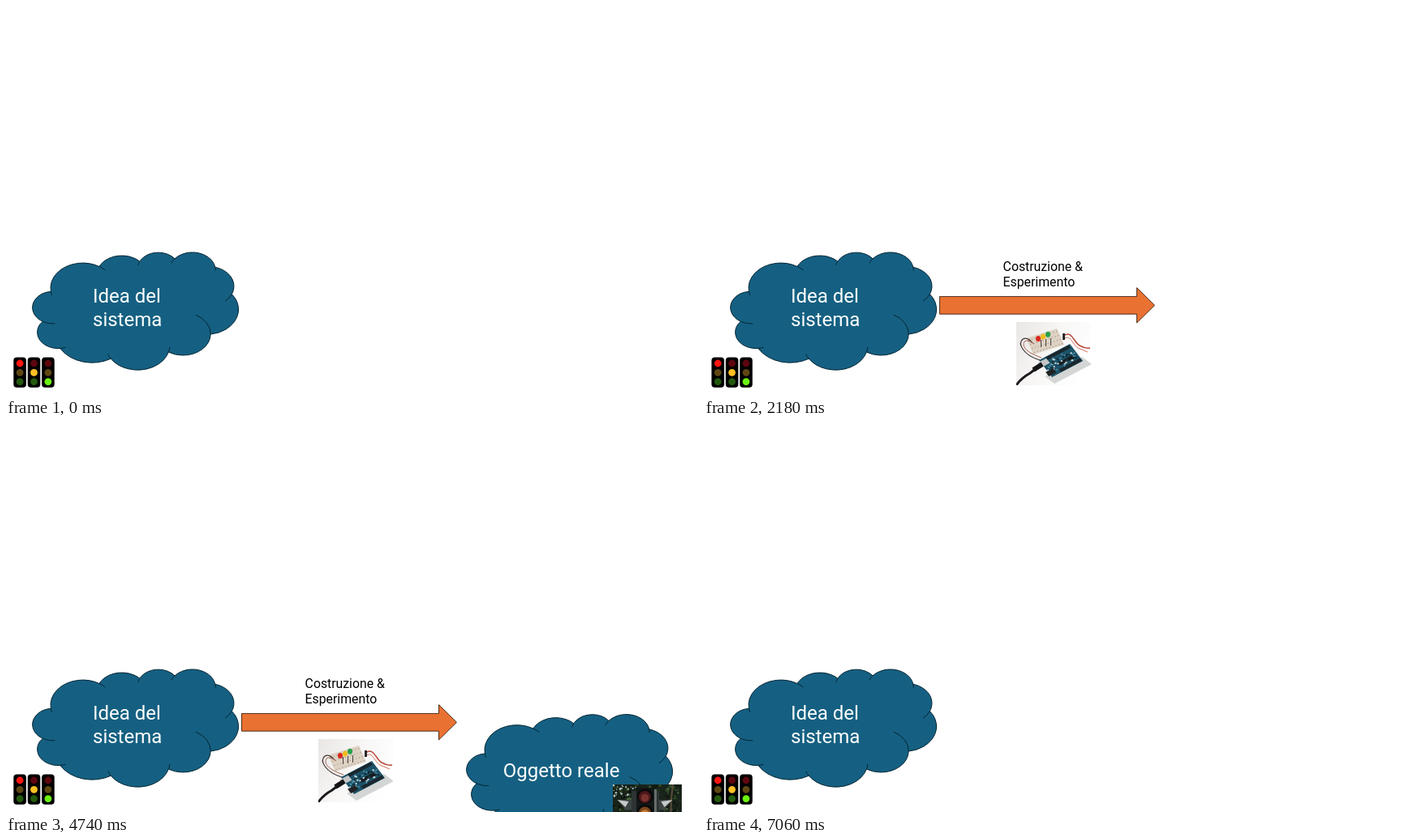
Write an HTML page with a canvas that moves like this. It is 853x480 px and loops after 8 s.

```html
<!DOCTYPE html>
<html lang="it">
<head>
<meta charset="utf-8">
<title>Idea del sistema</title>
<style>
html, body { margin: 0; width: 100%; height: 100%; overflow: hidden; background: #fff; }
canvas { display: block; }
</style>
</head>
<body>
<canvas id="stage" width="853" height="480"></canvas>
<script>
const ctx = document.getElementById('stage').getContext('2d');
const LOOP = 8000, STEP = 240, FONT = 'Roboto, "Open Sans", sans-serif';
const BUILD_AT = 500, REAL_AT = 3780, CLEAR_AT = 7060;
const CLOUD_W = 254, CLOUD_H = 145, BUMP_RATIO = 1.361;

// Where each bump of the cloud begins, in percent: x, y, radius,
// and the crease in degrees: > 0 runs on from the last bump, < 0 leads into this one
const KNOTS = [
  [9, 33.3, 15.6, -9], [32.4, 12, 12.3, 14], [52.1, 7.7, 10.1, -14], [69.1, 5.4, 11.2, -17],
  [88.7, 12.6, 12.3, 11], [96.8, 35.5, 15.7, 26], [86.5, 69.7, 13.4, -64], [66.1, 84.9, 15.6, -12],
  [38.1, 90.5, 17.9, 12], [13.5, 81.7, 10.1, -15], [5, 58.8, 10.1, -35]
];

// Clockwise arc of radius r between two knots, as a circle in flattened space
function bump([x0, y0, r], [x1, y1]) {
  const dx = x1 - x0, dy = (y1 - y0) / BUMP_RATIO, chord = Math.hypot(dx, dy);
  const h = Math.sqrt(Math.max(0, r * r - chord * chord / 4)) / chord;
  const cx = (x0 + x1) / 2 - dy * h, cy = (y0 + y1) / 2 / BUMP_RATIO + dx * h;
  const angle = (x, y) => Math.atan2(y / BUMP_RATIO - cy, x - cx);
  return { x: cx, y: cy * BUMP_RATIO, r, from: angle(x0, y0), to: angle(x1, y1) };
}

const outline = new Path2D(), creases = new Path2D();
const bumps = KNOTS.map((knot, i) => bump(knot, KNOTS[(i + 1) % KNOTS.length]));
const addArc = (path, b, from, to) => path.ellipse(b.x, b.y, b.r, b.r * BUMP_RATIO, 0, from, to);
bumps.forEach((b, i) => {
  addArc(outline, b, b.from, b.to);
  const [x, y, , degrees] = KNOTS[i], turn = degrees * Math.PI / 180;
  const last = bumps.at(i - 1), crease = new Path2D();
  if (turn > 0) addArc(crease, last, last.to, last.to + turn);
  else addArc(crease, b, b.from + turn, b.from);
  creases.addPath(crease);
});
outline.closePath();

function randomFrom(seed) {
  return () => (seed = seed * 16807 % 2147483647) / 2147483647;
}

function poly(color, ...pts) {
  ctx.beginPath();
  for (let i = 0; i < pts.length; i += 2) ctx.lineTo(pts[i], pts[i + 1]);
  ctx.closePath();
  ctx.fillStyle = color;
  ctx.fill();
}

function dot(color, x, y, rx, ry = rx) {
  ctx.beginPath();
  ctx.ellipse(x, y, rx, ry, 0, 0, 7);
  ctx.fillStyle = color;
  ctx.fill();
}

function rect(color, x, y, w, h) {
  ctx.fillStyle = color;
  ctx.fillRect(x, y, w, h);
}

function wire(color, width, d) {
  ctx.strokeStyle = color;
  ctx.lineWidth = width;
  ctx.stroke(new Path2D(d));
}

function label(text, x, y, size, color) {
  ctx.font = `${size}px ${FONT}`;
  ctx.fillStyle = color;
  ctx.fillText(text, x, y);
}

// Runs paint in a unit square skewed onto the edges u and v
function slab(x, y, ux, uy, vx, vy, paint) {
  ctx.save();
  ctx.transform(ux, uy, vx, vy, x, y);
  paint();
  ctx.restore();
}

function photo(x, y, w, h, paint) {
  ctx.save();
  ctx.translate(x, y);
  ctx.beginPath();
  ctx.rect(0, 0, w, h);
  ctx.clip();
  paint(w, h);
  ctx.restore();
}

function cloud(x, y) {
  const place = new DOMMatrix([CLOUD_W / 100, 0, 0, CLOUD_H / 100, x, y]);
  const body = new Path2D(), lines = new Path2D();
  body.addPath(outline, place);
  lines.addPath(outline, place);
  lines.addPath(creases, place);
  ctx.fillStyle = '#156082';
  ctx.fill(body);
  ctx.strokeStyle = '#042433';
  ctx.lineWidth = 1;
  ctx.stroke(lines);
}

function trafficLights() {
  const dim = ['#5c0610', '#5e4613', '#235a0d'];
  const lit = ['#ff1512', '#ffc024', '#6cf20f'];
  for (let i = 0; i < 3; i++) {
    const x = 9.3 + i * 17.4;
    ctx.beginPath();
    ctx.roundRect(x, 433.5, 15.6, 37.3, 4);
    ctx.fillStyle = '#000';
    ctx.fill();
    for (let j = 0; j < 3; j++) dot((i === j ? lit : dim)[j], x + 7.8, 441 + j * 11.3, 4.4);
  }
}

function arrow(x, y, tip, half, head) {
  const neck = tip - head;
  poly('#e97132', x, y - half / 2, neck, y - half / 2, neck, y - half, tip, y,
    neck, y + half, neck, y + half / 2, x, y + half / 2);
  ctx.strokeStyle = '#4d3220';
  ctx.lineWidth = 1;
  ctx.stroke();
}

function boardPhoto(w, h) {
  const rnd = randomFrom(5);
  const bg = ctx.createLinearGradient(0, 0, w, h * 0.6);
  bg.addColorStop(0, '#e9e6e4');
  bg.addColorStop(0.5, '#f8f7f6');
  bg.addColorStop(1, '#fff');
  rect(bg, 0, 0, w, h);

  // Breadboard with rows of holes
  slab(12, 20, 38, -12, 9, 20, () => {
    rect('#ddd2c4', 0, 0, 1, 1);
    for (let i = 0; i < 40; i++) rect('#a99c8d', (i % 10 + 0.4) / 10, (Math.floor(i / 10) + 0.5) / 4, 0.03, 0.06);
  });
  wire('#3a3032', 1.2, 'M29 47C9 41 1 27 8 21Q14 18 20 26');
  wire('#a5604e', 1, 'M31 44C14 38 6 31 10 24Q14 21 22 27');
  wire('#b8483b', 1.5, 'M58 17C69 10 70 24 78 29Q85 33 91 32');
  wire('#d0705c', 1, 'M58 21C67 14 69 28 76 32L88 37');
  for (let i = 0; i < 3; i++) {
    const x = 27 + i * 6;
    rect('#4a4340', x + 3, 22 - i, 1, 9);
    dot(['#d9271d', '#f0bd1c', '#27a04a'][i], x, 20.5 - i * 2.6, 3, 3.5);
  }
  rect('#2a2a2c', 57, 14, 3, 8);

  // Clear base plate, then the circuit board and its parts
  slab(35, 67, 46, -24, 12, 9, () => rect('#d4d5d5', 0, 0, 1, 1));
  slab(28, 47, 38, -20, 16, 21, () => {
    rect('#1c5268', 0, 0, 1, 1);
    rect('#1a272d', 0.2, 0.02, 0.75, 0.16);
    rect('#1a272d', 0.3, 0.82, 0.68, 0.16);
    rect('#161b1e', 0.4, 0.52, 0.5, 0.17);
    for (let i = 0; i < 45; i++) {
      rect(['#c9dade', '#10242d', '#468ca4'][i % 3], rnd() * 0.92, 0.16 + rnd() * 0.65, 0.05, 0.07);
    }
    rect('#c3c6c6', -0.08, 0.08, 0.28, 0.28);
    rect('#202326', -0.06, 0.65, 0.24, 0.25);
  });
  wire('#1a191b', 3, 'M-1 79Q6 69 17 63L26 56');
  wire('#151516', 6, 'M21 59L32 52');
}

function streetPhoto(w, h) {
  const rnd = randomFrom(11);
  const leaves = ['#2c4020', '#10180d', '#476039', '#1f2e18', '#0c110a', '#334b27'];
  rect('#18231a', 0, 0, w, h);
  for (let i = 0; i < 240; i++) dot(leaves[i % 6], rnd() * w, rnd() * h, 0.8 + rnd() * 2.4, 0.8 + rnd() * 1.6);
  for (let i = 0; i < 24; i++) dot('#a9bfc0', rnd() * 28, rnd() * 16, 0.5 + rnd());
  wire('#574b38', 2, 'M74 0Q68 41 76 82');

  // Side visors, mirrored about the housing and darker further down
  for (const side of [-1, 1]) {
    for (let i = 0; i < 3; i++) {
      ctx.save();
      ctx.translate(39.5, 19 + i * 19.5);
      ctx.scale(side, 1);
      poly('#3c4443', 14, 0, 33, 0, 24, 13, 14, 12);
      poly(`hsl(150 4% ${78 - i * 9}%)`, 20, 2, 34, 0, 24, 9);
      ctx.restore();
    }
  }
  rect('#2d3433', 23, 8, 34, 59);
  rect('#141818', 29, 4, 22, 62);
  rect('#656d6a', 51, 6, 3, 60);
  rect('#525a57', 35, 66, 10, 16);
  const lamps = [['#4b1719', '#79312d'], ['#7c471d', '#c17a33'], ['#0da36b', '#38e3a6']];
  lamps.forEach(([edge, glow], i) => {
    const y = 15.5 + i * 19.5;
    dot('#090b0b', 40, y - 1, 10, 9.5);
    dot(edge, 39.5, y, 7.5);
    dot(glow, 39.5, y + 1, 4.8);
  });
}

function ideaScene() {
  cloud(32.5, 304);
  label('Idea del', 107, 365.5, 24, '#fff');
  label('sistema', 107, 395.3, 24, '#fff');
  trafficLights();
}

function buildScene() {
  label('Costruzione &', 368.6, 327.3, 15.8, '#000');
  label('Esperimento', 368.6, 346.3, 15.8, '#000');
  arrow(290.5, 369.3, 555.5, 21.7, 22);
  photo(385, 390, 92, 78, boardPhoto);
}

function realScene() {
  cloud(567.5, 296.6);
  label('Oggetto reale', 612.8, 374.2, 24, '#fff');
  photo(748, 383, 85, 82, streetPhoto);
}

// Rises into place in even steps, then stays until cleared
function rise(t, start, from, speed, scene) {
  if (t < start || t >= CLEAR_AT) return;
  const step = Math.floor((t - start) / STEP);
  ctx.save();
  ctx.translate(0, Math.max(0, Math.round(from - speed * step)));
  scene();
  ctx.restore();
}

function draw(t) {
  rect('#fff', 0, 0, 853, 480);
  ideaScene();
  rise(t, BUILD_AT, 151, 23, buildScene);
  rise(t, REAL_AT, 159.75, 24.3, realScene);
}

const origin = performance.now();
function tick() {
  draw((performance.now() - origin) % LOOP);
  requestAnimationFrame(tick);
}
tick();
</script>
</body>
</html>
```
